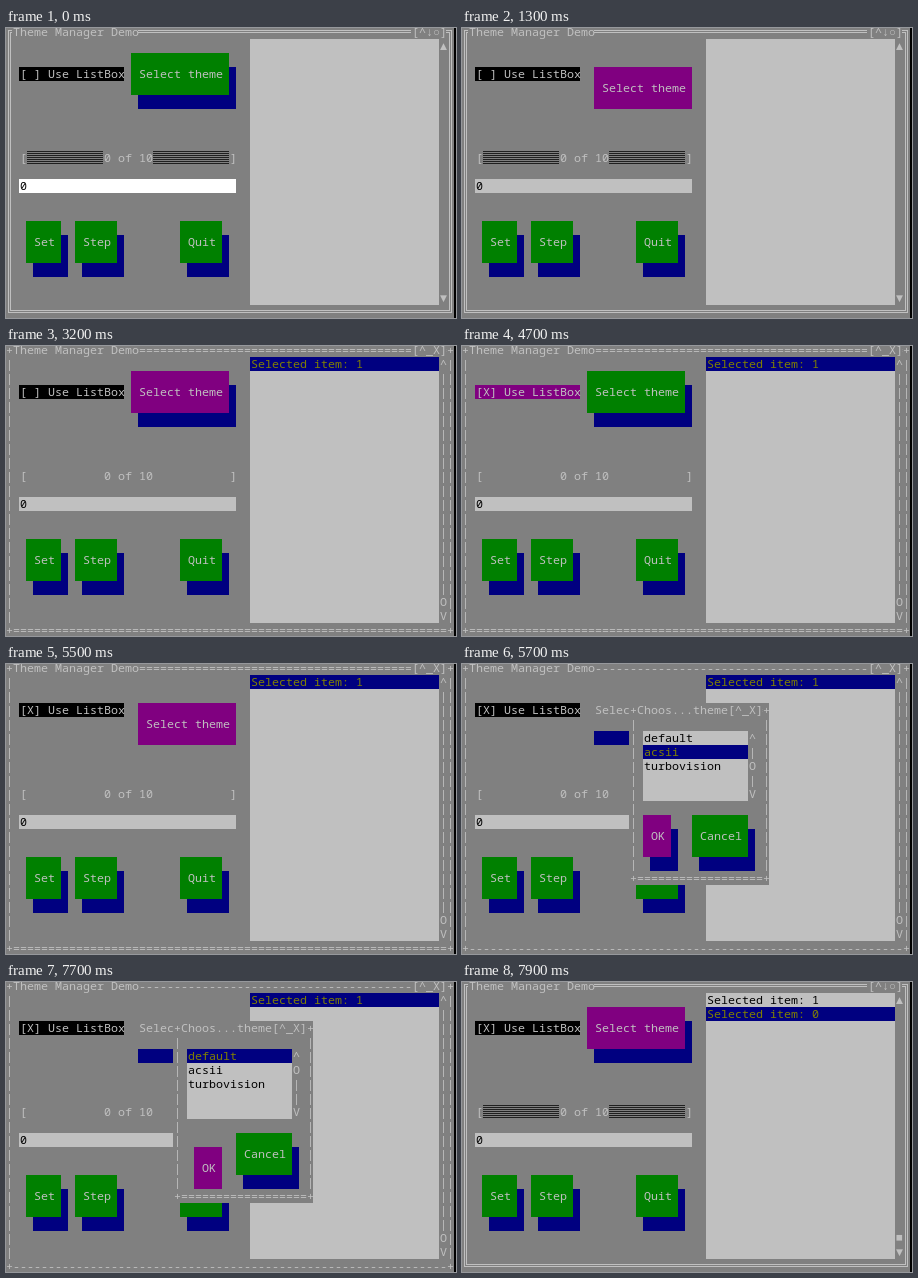
An HTML page with a canvas that plays this animation: 450x290 px, repeating every 8 s.

```html
<!DOCTYPE html>
<html lang="en">
<head>
<meta charset="utf-8">
<title>Theme Manager Demo</title>
<style>
  html, body { margin: 0; width: 100%; height: 100%; overflow: hidden; background: #000; }
  canvas { display: block; width: 450px; height: 290px; }
</style>
</head>
<body>
<canvas id="screen" width="450" height="290"></canvas>
<script>
const LOOP = 8000, CW = 7, CH = 14;
const GRAY = '#808080', SILVER = '#c0c0c0', BLACK = '#000', WHITE = '#fff',
      GREEN = '#008000', NAVY = '#000080', PURPLE = '#800080', OLIVE = '#808000';
const ctx = document.getElementById('screen').getContext('2d');

const THEMES = {
  default: { icons: '[^↓○]', up: '▲', down: '▼', thumb: '■', page: ' ' },
  ascii: { icons: '[^_X]', up: '^', down: 'V', thumb: 'O', page: '|' }
};

// Cell backgrounds sit one pixel left of the glyph origin.
const left = col => col * CW - 1;
const top_ = row => row * CH - 3;

function box(col, row, cols, rows, color) {
  ctx.fillStyle = color;
  ctx.fillRect(left(col), top_(row), cols * CW, rows * CH);
}

function text(col, row, str, color = SILVER) {
  ctx.fillStyle = color;
  [...str].forEach((ch, i) => ctx.fillText(ch, (col + i) * CW, top_(row) + 11));
}

function button(col, row, label, color = GREEN, pressed = false) {
  const cols = label.length + 2;
  if (pressed) { col++; row++; }
  else box(col + 1, row + 1, cols, 3, NAVY);
  box(col, row, cols, 3, color);
  text(col + 1, row + 1, label);
}

function lineFrame(col, row, cols, rows, active) {
  ctx.strokeStyle = SILVER;
  ctx.lineWidth = 1;
  const x = col * CW + 3.5, y = top_(row) + 6.5;
  const w = (cols - 1) * CW, h = (rows - 1) * CH;
  for (const d of active ? [-1, 1] : [0])
    ctx.strokeRect(x + d, y + d, w - 2 * d, h - 2 * d);
}

function asciiFrame(col, row, cols, rows, active) {
  const edge = '+' + (active ? '=' : '-').repeat(cols - 2) + '+';
  text(col, row, edge);
  text(col, row + rows - 1, edge);
  for (let r = row + 1; r < row + rows - 1; r++) {
    text(col, r, '|');
    text(col + cols - 1, r, '|');
  }
}

function panel(col, row, cols, rows, title, active, ascii) {
  const { icons } = ascii ? THEMES.ascii : THEMES.default;
  const iconCol = col + cols - 1 - icons.length;
  box(col, row, cols, rows, GRAY);
  (ascii ? asciiFrame : lineFrame)(col, row, cols, rows, active);
  box(col + 1, row, title.length, 1, GRAY);
  box(iconCol, row, icons.length, 1, GRAY);
  text(col + 1, row, title);
  text(iconCol, row, icons);
}

function scrollbar(col, row, rows, thumbRow, ascii) {
  const theme = ascii ? THEMES.ascii : THEMES.default;
  text(col, row, theme.up);
  for (let r = 1; r < rows - 1; r++)
    text(col, row + r, r === thumbRow ? theme.thumb : theme.page);
  text(col, row + rows - 1, theme.down);
}

function listBox(col, row, cols, rows, items, selected, focused) {
  box(col, row, cols, rows, focused ? WHITE : SILVER);
  items.forEach((item, i) => {
    if (i === selected) box(col, row + i, cols, 1, NAVY);
    text(col, row + i, item, i === selected ? OLIVE : BLACK);
  });
}

function shade(col, row, cols) {
  ctx.fillStyle = 'rgba(0,0,0,.75)';
  for (let y = 0; y < CH; y += 2)
    ctx.fillRect(col * CW, top_(row) + y, cols * CW - 1, 1);
}

function mainWindow(s) {
  panel(0, 0, 64, 21, 'Theme Manager Demo', !s.dialog, s.ascii);
  box(2, 3, 15, 1, s.focus === 'check' ? PURPLE : BLACK);
  text(2, 3, `[${s.checked ? 'X' : ' '}] Use ListBox`);

  const selectColor = s.dialog ? GRAY : s.focus === 'select' ? PURPLE : GREEN;
  button(18, 2, 'Select theme', selectColor, s.selectDown);

  text(2, 9, '[');
  text(14, 9, '0 of 10');
  text(32, 9, ']');
  if (!s.ascii) { shade(3, 9, 11); shade(21, 9, 11); }

  box(2, 11, 31, 1, s.focus === 'edit' ? WHITE : SILVER);
  text(2, 11, '0', BLACK);
  if (s.caret) {
    ctx.fillStyle = BLACK;
    ctx.fillRect(3 * CW, top_(11), CW, CH);
  }

  button(3, 14, 'Set');
  button(10, 14, 'Step');
  button(25, 14, 'Quit');
  listBox(35, 1, 27, 19, s.items, s.items.length - 1, false);
  scrollbar(62, 1, 19, s.items.length ? 17 : -1, s.ascii);
}

const NAMES = ['default', 'acsii', 'turbovision'];

function dialog({ kind, chosen, okDown }) {
  const list = kind === 'list', listFocus = chosen && !okDown;
  const selected = list === chosen ? 0 : 1;
  panel(24, 3, 20, list ? 13 : 11, 'Choos...theme', true, list);
  if (list) {
    listBox(26, 5, 15, 5, NAMES, selected, listFocus);
    scrollbar(41, 5, 5, selected + 1, true);
  } else {
    NAMES.forEach((name, i) => {
      const on = i === selected;
      box(26, 5 + i, 16, 1, on && listFocus ? PURPLE : BLACK);
      text(26, 5 + i, `(${on ? '*' : ' '}) ${name}`);
    });
  }
  const row = list ? 11 : 9;
  button(26, row, 'OK', listFocus ? GREEN : PURPLE, okDown);
  button(33, row, 'Cancel');
}

function stateAt(t) {
  const within = (a, b) => t >= a && t < b;
  let open = null;
  if (within(1400, 3200)) open = { kind: 'radio', chosen: t >= 2200, okDown: t >= 3000 };
  if (within(5700, 7900)) open = { kind: 'list', chosen: t >= 6400, okDown: t >= 7700 };
  return {
    dialog: open,
    ascii: within(3200, 7900),
    checked: t >= 4700,
    caret: within(700, 1300),
    focus: t < 1200 ? 'edit' : within(4700, 5500) ? 'check' : 'select',
    selectDown: within(1200, 1400) || within(5500, 5700),
    items: ['Selected item: 1', 'Selected item: 0'].slice(0, (t >= 3200) + (t >= 7900))
  };
}

function draw() {
  const state = stateAt(performance.now() % LOOP);
  ctx.font = '11.667px "Noto Sans Mono", "DejaVu Sans Mono", monospace';
  ctx.fillStyle = BLACK;
  ctx.fillRect(0, 0, 450, 290);
  ctx.fillStyle = GRAY;
  ctx.fillRect(0, 0, 448, 290);
  mainWindow(state);
  if (state.dialog) dialog(state.dialog);
  requestAnimationFrame(draw);
}
draw();
</script>
</body>
</html>
```
